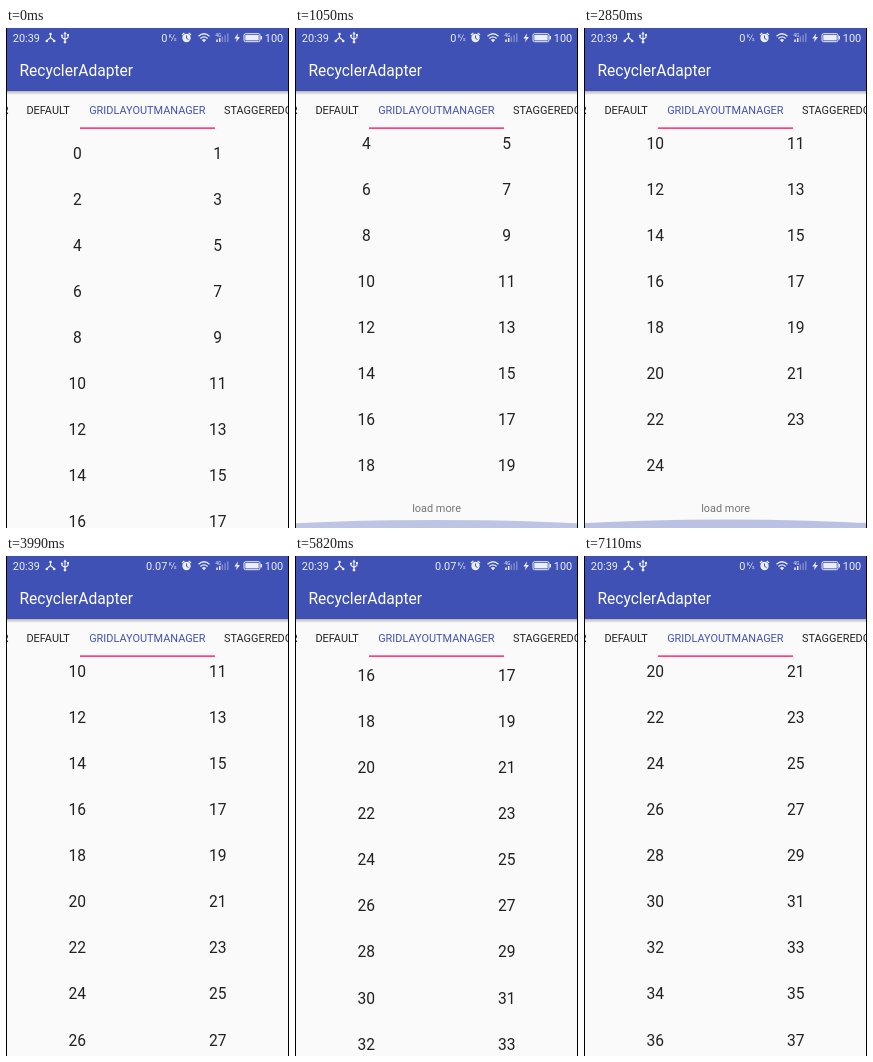
Write an HTML page that moves like this. It is 283 px wide and 500 px high and loops after 7140 ms.

```html
<!DOCTYPE html>
<html lang="en">
<head>
<meta charset="utf-8">
<title>RecyclerAdapter</title>
<style>
  html, body { margin: 0; width: 100%; height: 100%; overflow: hidden; background: #fafafa; }
  svg { display: block; width: 100vw; height: 100vh; }
  text { font-family: Roboto, sans-serif; font-size: 10.92px; fill: #212121; }
  .title, .item { font-size: 15.6px; }
  .item, .footer { text-anchor: middle; }
  .footer { fill: #757575; }
  .title, .status text { fill: #fff; }
  .status { fill: #fff; opacity: .9; }
  .status text.tiny { font-size: 5px; }
  .line { fill: none; stroke: #fff; }
  .tabs .active { fill: #3f51b5; }
</style>
</head>
<body>
<svg viewBox="0 0 283 500" preserveAspectRatio="none">
  <defs>
    <linearGradient id="shadow" x2="0" y2="1">
      <stop stop-opacity=".28"/>
      <stop offset="1" stop-opacity="0"/>
    </linearGradient>
  </defs>
  <rect width="283" height="500" fill="#fafafa"/>

  <g id="list">
    <text class="footer" id="footer" x="141.6">load more</text>
  </g>
  <ellipse id="glow" cx="141.5" rx="424" fill="#3f51b5"/>

  <g class="tabs">
    <rect y="63" width="283" height="39" fill="#fafafa"/>
    <text x="2.4" y="86" text-anchor="end">LINEAR</text>
    <text x="20.4" y="86">DEFAULT</text>
    <text class="active" x="83.2" y="86">GRIDLAYOUTMANAGER</text>
    <text x="218" y="86">STAGGEREDGRIDLAYOUTMANAGER</text>
    <rect x="74" y="99.3" width="135" height="1.7" fill="#ff4081"/>
  </g>

  <rect width="283" height="63" fill="#3f51b5"/>
  <rect y="63" width="283" height="4" fill="url(#shadow)"/>
  <text class="title" x="13.4" y="48">RecyclerAdapter</text>

  <g class="status">
    <text x="6.8" y="13.7">20:39</text>
    <path class="line" d="M44.5 5.5V9.5L40.5 13M44.5 9.5L48.5 13" stroke-width="1.1"/>
    <circle cx="44.5" cy="6" r="1.3"/>
    <circle cx="40.8" cy="13" r="1.3"/>
    <circle cx="48.2" cy="13" r="1.3"/>
    <path class="line" d="M59 5V14M56 7.5V9.5L59 11.5L62 9.5V7" stroke-width="1.1"/>
    <path d="M57.3 6.2L59 3.6L60.7 6.2Z"/>
    <circle cx="59" cy="14" r="1.4"/>
    <circle cx="56" cy="7.5" r="1.1"/>
    <rect x="61" y="6" width="2" height="2"/>

    <text id="speed" x="161.3" y="13.7" text-anchor="end">0</text>
    <text class="tiny" x="162.8" y="9.6">K</text>
    <path class="line" d="M165.3 13L168.5 6.5" stroke-width=".7"/>
    <text class="tiny" x="168" y="13.4">s</text>

    <circle cx="180.5" cy="10" r="4.2"/>
    <path class="line" d="M176 7L178.3 5M185 7L182.7 5" stroke-width="1.3"/>
    <path d="M180.5 7.5V10.3L182.5 11.5" fill="none" stroke="#3f51b5"/>

    <path class="line" d="M192.5 8.2Q198 3.4 203.5 8.2M194.4 10.4Q198 7.3 201.6 10.4" stroke-width="1.3"/>
    <path d="M195.9 12Q198 10.2 200.1 12L198 14.3Z"/>

    <text class="tiny" x="209.3" y="8.8">4G</text>
    <path class="line" d="M211 14V11.5M213.7 14V10" stroke-width="1.5"/>
    <path class="line" d="M216.4 14V8.5M219.1 14V7M221.8 14V5.3" stroke-width="1.3" opacity=".4"/>

    <path d="M232.2 5.3L228.3 10.5H230.8L230 14.3L234 9H231.4Z"/>
    <rect class="line" x="238" y="5.7" width="16" height="8" rx="1.5"/>
    <rect x="239.3" y="7" width="13.4" height="5.4"/>
    <rect x="254.5" y="8" width="1.5" height="3.4"/>
    <text x="258.8" y="13.7">100</text>
  </g>

  <path d="M.5 0V500M282.5 0V500" stroke="#000"/>
</svg>
<script>
  const LOOP = 7140, STEP = 30;
  const LIST_TOP = 102, ROW = 46.1, FOOTER = 39, BOTTOM = 500;
  const FIRST_PAGE = 20, PAGE = 5;
  const FADE = 120, FOOTER_BLANK = 150;

  const loads = [2160, 3810, 5400, 7020];
  const scrolls = [[780, 990], [2460, 2760], [4080, 4230], [5700, 6000]];
  const glows = [[990, 1080, 1470], [2760, 2880, 3150], [6000, 6120, 6420]];
  const GLOW_HEIGHT = 9.1, GLOW_ALPHA = .36;

  const byId = id => document.getElementById(id);
  const list = byId('list'), footer = byId('footer'), glow = byId('glow'), speed = byId('speed');

  const progress = (t, from, to) => Math.min(1, Math.max(0, (t - from) / (to - from)));
  const smooth = p => p * p * (3 - 2 * p);
  const rowsFor = count => Math.ceil(count / 2);
  const endOffset = count => LIST_TOP + rowsFor(count) * ROW + FOOTER - BOTTOM;

  const items = Array.from({ length: FIRST_PAGE + PAGE * loads.length }, (_, i) => {
    const item = document.createElementNS('http://www.w3.org/2000/svg', 'text');
    item.setAttribute('class', 'item');
    item.setAttribute('x', i % 2 ? 211.7 : 71.3);
    item.setAttribute('y', LIST_TOP + (Math.floor(i / 2) + .5) * ROW + 5.5);
    item.textContent = i;
    return list.appendChild(item);
  });

  function scrollOffset(t) {
    let offset = 0;
    scrolls.forEach(([from, to], i) => {
      const target = endOffset(FIRST_PAGE + PAGE * i);
      if (t > from) offset += (target - offset) * progress(t, from, to) ** 1.3;
    });
    return offset;
  }

  function glowStrength(t) {
    const active = glows.find(([from, , to]) => t >= from && t < to);
    if (!active) return 0;
    const [from, peak, to] = active;
    return t < peak
      ? 1 - (1 - progress(t, from, peak)) ** 2
      : (1 - progress(t, peak, to)) ** 2;
  }

  function render(t) {
    list.setAttribute('transform', `translate(0 ${-scrollOffset(t)})`);

    items.forEach((item, i) => {
      const page = Math.floor((i - FIRST_PAGE) / PAGE);
      const start = loads[page] - STEP;
      item.setAttribute('opacity', page < 0 ? 1 : smooth(progress(t, start, start + FADE)));
    });

    const loaded = loads.filter(time => t >= time).length;
    const blank = loads.some(time => t >= time - FOOTER_BLANK && t < time);
    footer.setAttribute('y', LIST_TOP + rowsFor(FIRST_PAGE + PAGE * loaded) * ROW + 23.4);
    footer.setAttribute('opacity', blank ? 0 : 1);

    // The edge glow is a wide circle squashed vertically against the bottom.
    const strength = glowStrength(t);
    const height = GLOW_HEIGHT * strength;
    const radius = height * 424 / 57;
    glow.setAttribute('ry', radius);
    glow.setAttribute('cy', BOTTOM - height + radius);
    glow.setAttribute('opacity', GLOW_ALPHA * strength);

    speed.textContent = t >= 3270 && t < 6060 ? '0.07' : '0';
  }

  const begin = performance.now();
  function tick() {
    const t = (performance.now() - begin) % LOOP;
    render(Math.floor(t / STEP) * STEP);
    requestAnimationFrame(tick);
  }
  render(0);
  requestAnimationFrame(tick);
</script>
</body>
</html>
```
